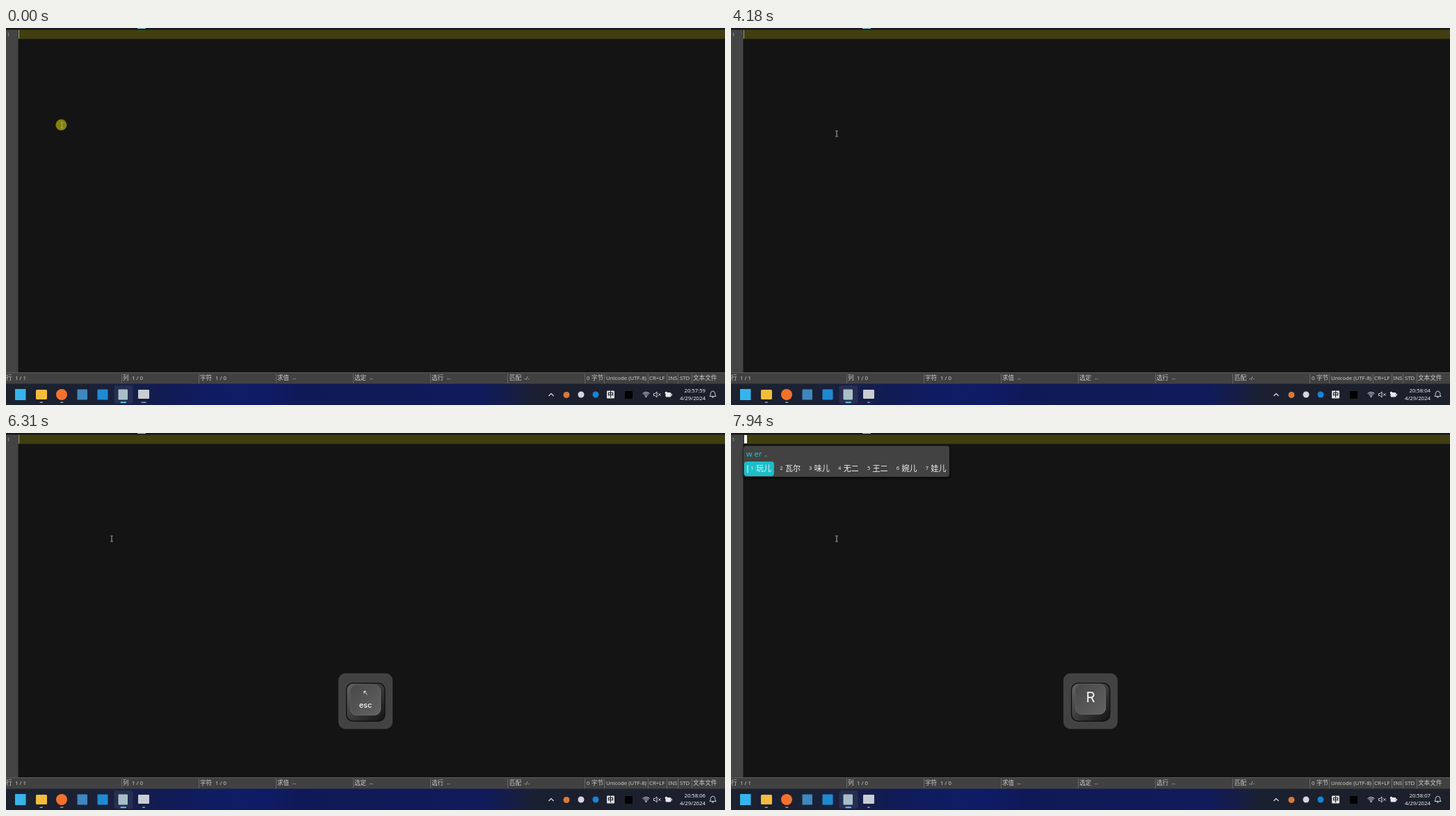
An HTML page with a canvas that plays this animation: 1034x542 px, repeating every 8000 ms.

```html
<!DOCTYPE html>
<html lang="zh">
<head>
<meta charset="utf-8">
<style>
html, body { margin: 0; width: 100%; height: 100%; overflow: hidden; background: #141414; }
canvas { display: block; width: 1034px; height: 542px; }
</style>
</head>
<body>
<canvas id="stage" width="1034" height="542"></canvas>
<script>
const ctx = document.getElementById('stage').getContext('2d');
const LOOP = 8000;
const UI = '"Noto Sans", "Noto Sans CJK SC", "Noto Sans CJK", sans-serif';
const CJK = '"Noto Sans CJK SC", "Noto Sans CJK", sans-serif';
const KEY = 'Inter, sans-serif';

// Moments at which the blinking caret flips; it starts visible.
const CARET = [450, 980, 1510, 2040, 2570, 3120, 3630, 4180, 4720, 4780, 5770, 6310, 6850, 7380, 7910];
const TICKS = [70, 1110, 2110, 3120, 4110, 5120, 6130, 7110];
const KEYS = [[4780, 'W'], [6310, 'esc'], [7250, 'W'], [7500, 'E'], [7720, 'R']];
const POPUPS = [
  [4850, 'menu'],
  [6310, null],
  [7310, { code: 'w', words: ['我', '为', '无', '玩', '问', '完', '王'] }],
  [7560, { code: 'w e', words: ['万恶', '我饿', '无恶', '为恶', '微恶', '五鹅', '瓦额'] }],
  [7790, { code: 'w er', words: ['玩儿', '瓦尔', '味儿', '无二', '王二', '婉儿', '娃儿'] }]
];

const clamp = (v) => Math.max(0, Math.min(1, v));
const progress = (t, from, to) => clamp((t - from) / (to - from));
const smooth = (p) => p * p * (3 - 2 * p);
const countPast = (list, t) => list.filter((v) => v <= t).length;
const latest = (list, t) => list.filter((item) => item[0] <= t).pop();

function rect(x, y, w, h, color) {
  ctx.fillStyle = color;
  ctx.fillRect(x, y, w, h);
}

function round(x, y, w, h, r, color) {
  ctx.beginPath();
  ctx.roundRect(x, y, w, h, r);
  ctx.fillStyle = color;
  ctx.fill();
}

function circle(x, y, r, color) {
  ctx.beginPath();
  ctx.arc(x, y, r, 0, Math.PI * 2);
  ctx.fillStyle = color;
  ctx.fill();
}

function text(str, x, y, size, color, family = UI, align = 'left', weight = 400) {
  ctx.font = `${weight} ${size}px ${family}`;
  ctx.textAlign = align;
  ctx.fillStyle = color;
  ctx.fillText(str, x, y);
}

function line(points, color, width = 1) {
  ctx.beginPath();
  points.forEach(([x, y], i) => i ? ctx.lineTo(x, y) : ctx.moveTo(x, y));
  ctx.strokeStyle = color;
  ctx.lineWidth = width;
  ctx.stroke();
}

function gradient(x0, y0, x1, y1, stops) {
  const g = ctx.createLinearGradient(x0, y0, x1, y1);
  stops.forEach(([at, color]) => g.addColorStop(at, color));
  return g;
}

function drawEditor(t, composing) {
  rect(0, 0, 1034, 542, '#141414');
  rect(0, 0, 1034, 2, '#19191c');
  rect(189, 0, 12, 1, '#9bdcf0');
  rect(0, 2.5, 17.5, 493, '#444444');
  rect(17.5, 2.5, 1017, 13.2, '#413f12');
  text('1', 1.5, 12, 7.5, '#a8a8a8');
  if (composing) rect(19, 3, 4, 12, '#ffffff');
  if (countPast(CARET, t) % 2 === 0) rect(18, 2.7, 1, 12.6, composing ? '#ffffff' : '#a3a18c');
}

function drawPointer(t) {
  const clicking = t < 140;
  if (clicking) circle(79.4, 139.3, 8, '#868008');
  const p = smooth(progress(t, 200, 720));
  const x = 80.5 + 71.5 * p, y = 139.7 + 12.3 * p;
  const color = clicking ? '#b3ad68' : '#b4b4b4';
  line([[x, y - 3.5], [x, y + 3.5]], color);
  for (const dy of [-4, 4]) line([[x - 2, y + dy], [x + 2, y + dy]], color, 0.8);
}

function drawStatus() {
  const color = '#cacaca', y = 506;
  rect(0, 495, 1034, 17, '#414141');
  rect(0, 495, 1034, 1, '#5c5c5c');
  for (const x of [166, 277, 388, 499, 610, 721, 832, 860, 923, 950, 966, 986]) rect(x, 497, 1, 14, '#666666');
  const fields = [['行', 0, '1 / 1', 13], ['列', 168, '1 / 0', 181], ['字符', 279, '1 / 0', 301],
    ['求值', 390, '--', 412], ['选定', 501, '--', 523], ['选行', 612, '--', 634],
    ['匹配', 724, '-/-', 745], ['字节', 842, '0', 835], ['文本文件', 988, '', 0]];
  for (const [label, lx, value, vx] of fields) {
    text(label, lx, y, 8.6, color, CJK);
    text(value, vx, y, 7.9, color);
  }
  text('Unicode (UTF-8)', 863, y, 7.8, color);
  text('CR+LF', 925, y, 7.8, color);
  text('INS', 952.5, y, 7.8, color);
  text('STD', 969, y, 7.8, color);
}

function drawTray() {
  const white = '#e8e8ec';
  line([[780.5, 529], [784, 525.5], [787.5, 529]], white, 1.1);
  circle(806, 527.5, 4.5, '#d9793a');
  circle(827, 527, 4.5, '#d4d6da');
  circle(848, 527, 4.5, '#1684d8');
  round(864, 521.5, 11, 11, 1, '#e0e0e0');
  text('中', 869.5, 530.3, 9, '#20242e', CJK, 'center', 700);
  rect(890, 522, 11, 11, '#000000');

  for (const r of [2.7, 4.8, 6.9]) {
    ctx.beginPath();
    ctx.arc(920.5, 530.5, r, -Math.PI * 0.76, -Math.PI * 0.24);
    ctx.strokeStyle = white;
    ctx.lineWidth = 1;
    ctx.stroke();
  }
  circle(920.5, 530, 1, white);

  line([[931.5, 525.5], [933.5, 525.5], [936, 523], [936, 531], [933.5, 528.5], [931.5, 528.5], [931.5, 525.5]], white, 0.9);
  line([[938, 525.3], [941.5, 528.8]], white, 0.9);
  line([[941.5, 525.3], [938, 528.8]], white, 0.9);

  round(948.5, 524, 8, 6.5, 1.5, white);
  rect(957, 526, 1, 2.5, white);
  circle(949.5, 524.5, 1.8, white);

  line([[1012, 529.5], [1013.2, 527.5], [1013.2, 525.5], [1014.3, 523], [1016.5, 522],
    [1018.7, 523], [1019.8, 525.5], [1019.8, 527.5], [1021, 529.5], [1012, 529.5]], white, 0.9);
  line([[1015.2, 531], [1017.8, 531]], white, 1);
}

function drawTaskbar(t) {
  rect(0, 511.5, 1034, 31, gradient(0, 0, 1034, 0, [
    [0, '#1c212d'], [0.11, '#1b2133'], [0.17, '#172046'], [0.22, '#111b54'], [0.27, '#101c60'],
    [0.36, '#0f1b66'], [0.41, '#0f1957'], [0.5, '#101a56'], [0.58, '#101a5a'],
    [0.66, '#111b5c'], [0.7, '#151d48'], [0.735, '#1a2032'], [0.8, '#1c202d'], [1, '#1c202b']
  ]));
  round(155.5, 514, 27, 26, 3, 'rgba(255,255,255,.07)');

  rect(13, 519, 15.5, 16, '#35b4ec');
  round(43, 520, 16, 14, 1.5, '#f3bd3c');
  circle(80, 527, 8, '#f2722c');
  round(102.5, 519.5, 14.5, 15, 1, '#3f87bd');
  round(131.5, 519.5, 15, 15, 1, '#1f8ad2');
  round(161.5, 519.5, 13.5, 15, 1, '#a9bfc8');
  round(190, 520, 16, 13, 1, '#c9ccd3');

  const idle = '#9da0a8';
  round(48.5, 537.5, 4.5, 1.6, 0.8, idle);
  round(78, 537.5, 4.5, 1.6, 0.8, idle);
  round(164.5, 537.3, 8.5, 2, 1, '#5cc5e8');
  const w = 7.5 - 3.5 * progress(t, 70, 270);
  round(198 - w / 2, 537.5, w, 1.6, 0.8, idle);

  drawTray();
  const n = countPast(TICKS, t);
  text(n ? `20:58:0${n - 1}` : '20:57:59', 1006, 524, 7.7, '#f0f0f2', UI, 'right');
  text('4/29/2024', 1006, 535, 7.8, '#f0f0f2', UI, 'right');
}

function popupFrame(width, selected) {
  ctx.save();
  ctx.shadowColor = 'rgba(0,0,0,.65)';
  ctx.shadowBlur = 5;
  ctx.shadowOffsetY = 2;
  round(18, 18.5, width, 44.5, 4, '#424242');
  ctx.restore();
  round(19, 41, selected, 21, 4, '#1cbec8');
  round(23.3, 46, 1.2, 11.5, 0.6, '#d8f6f8');
}

function candidate(n, word, x, size = 11) {
  text(n, x, 53.3, 7.5, '#eeeeee');
  text(word, x + 7.7, 55.4, size, '#f6f6f6', CJK);
}

function drawMenu() {
  popupFrame(343.5, 111.5);
  text('〔方案切换〕', 22, 34, 11, '#f58a58', CJK);
  candidate('1', '薄荷拼音-全拼输入', 28.3, 10.8);
  candidate('2', '中', 138.3);
  candidate('3', '地球拼音-薄荷定制', 258.8, 10.8);
  for (const x of [160.5, 185.8, 207.5, 229]) text('/', x, 55.2, 11, '#f2f2f2');
  text('半', 193.5, 55.4, 11, '#f6f6f6', CJK);
  text('简', 215, 55.4, 11, '#f6f6f6', CJK);
  text('。', 236, 55.4, 11, '#f6f6f6', CJK);
  circle(175.5, 51.5, 5.6, '#e9a34c');
  round(171.8, 51.8, 7.4, 3.7, 1.5, '#f5f0e8');
  line([[172.6, 49.8], [174.3, 49.8]], '#5a3518', 1);
  line([[176.8, 49.8], [178.5, 49.8]], '#5a3518', 1);
}

function drawCandidates({ code, words }) {
  const pitch = 20 + words[0].length * 10.95;
  popupFrame(pitch * words.length + 2.7, pitch + 1);
  text(code, 22, 34, 11, '#27c3cf');
  const end = 22 + ctx.measureText(code).width + 4;
  line([[end, 34.3], [end + 1.7, 32.2], [end + 3.4, 34.3]], '#5b9da2', 0.9);
  words.forEach((word, i) => candidate(String(i + 1), word, 28.3 + i * pitch));
}

function drawKey(t) {
  if (t < 4720) return;
  const grow = smooth(progress(t, 4780, 4980));
  const width = 64 + 14 * grow;
  round(517 - width / 2, 345.5, width, 80, 10, '#424242');
  const pressed = latest(KEYS, t);
  if (!pressed) return;

  const [start, label] = pressed;
  const first = start === 4780;
  const press = first ? 0 : 3 * Math.min(progress(t, start - 40, start + 50), 1 - progress(t, start + 110, start + 200));
  ctx.save();
  ctx.globalAlpha = progress(t, 4780, 5050);
  ctx.translate(18 * (1 - progress(t, 4780, 5390)), 0);
  round(489, 359, 56.5, 56, 10, '#0d0d0d');
  round(490.3, 360.3, 53.9, 53.4, 9, gradient(492, 362, 542, 412, [[0, '#646464'], [0.45, '#404040'], [1, '#161616']]));
  ctx.translate(0, press);
  round(495, 360.5, 44, 44, 9, gradient(495, 361, 539, 404, [[0, '#484848'], [1, '#626262']]));
  ctx.beginPath();
  ctx.roundRect(495.4, 360.9, 43.2, 43.2, 9);
  ctx.strokeStyle = gradient(495, 361, 539, 404, [[0, '#505050'], [1, '#7c7c7c']]);
  ctx.lineWidth = 0.8;
  ctx.stroke();
  if (label === 'esc') {
    line([[519.5, 374.6], [514.9, 370]], '#f4f4f4', 1);
    line([[514.9, 373], [514.9, 370], [517.9, 370]], '#f4f4f4', 1);
    text('esc', 517, 394, 11, '#f6f6f6', KEY, 'center', 500);
  } else {
    text(label, 517, 386.5, 20.5, '#f6f6f6', KEY, 'center');
  }
  ctx.restore();
}

function draw(t) {
  const composing = (t >= 4780 && t < 6310) || t >= 7310;
  drawEditor(t, composing);
  drawPointer(t);
  const [, popup] = latest(POPUPS, t) || [];
  if (popup === 'menu') drawMenu();
  else if (popup) drawCandidates(popup);
  drawKey(t);
  drawStatus();
  drawTaskbar(t);
}

const begin = performance.now();
function frame() {
  draw((performance.now() - begin) % LOOP);
  requestAnimationFrame(frame);
}
frame();
</script>
</body>
</html>
```
